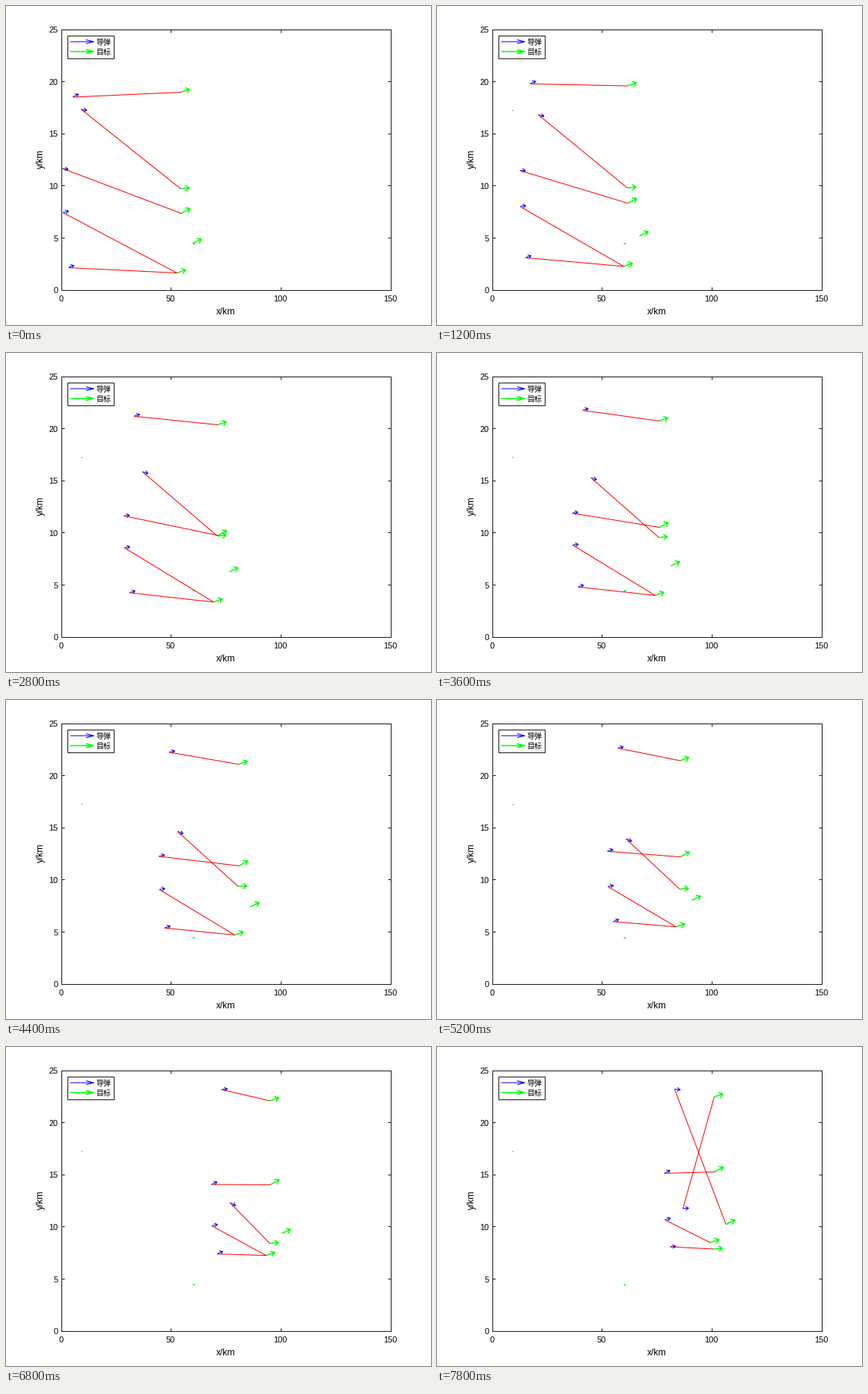
Recreate the animation shown at these times as a matplotlib script. Size 560x420 px, loop 8000 ms.

```python
import numpy as np
import matplotlib.pyplot as plt
from matplotlib.animation import FuncAnimation
from matplotlib.patches import Rectangle

W, H, DPI = 560, 420, 100
PX = 72 / DPI
FRAMES, STEP_MS = 40, 200
SWITCH = 35                 # step at which missiles are reassigned
INK, BLUE, GREEN, RED = "#1c1c1c", "#0000ff", "#00ff00", "#ff0000"
MISSILE_VX, TARGET_VX = 5.77, 3.455

# start x, start y, y at step 34, bend, skew of the bend, turn after SWITCH
MISSILES = [
    (88.5, 120.5, 56.5, -0.037, 0, 0.106),
    (99.5, 136.5, 205.5, -0.029, 0, -0.49),
    (75.0, 214.5, 181.5, 0.050, 0, 0),
    (75.5, 272.5, 236.0, 0, 0.0008, 0.05),
    (82.5, 345.0, 273.0, 0.005, 0.0007, 0.32),
]
# start x, start y, y at step 39, bend, rise of the arrow
TARGETS = [
    (231.0, 114.0, 66.2, -0.0051, -4),
    (230.5, 241.0, 266.5, -0.0250, -1),
    (231.5, 273.5, 165.0, 0.0176, -6.5),
    (246.5, 313.0, 234.0, 0.0113, -5.5),
    (225.7, 352.0, 258.0, 0.0292, -4),
]
LINKS_EARLY = [0, 1, 2, 4, 4]
LINKS_LATE = [3, 0, 2, 4, 1]


def arc(k, y0, y1, span, bend):
    """Straight run from y0 to y1 over span steps, bowed by bend."""
    return y0 + (y1 - y0) * k / span + bend * k * (span - k)


def missile_y(k, y0, y1, bend, skew, turn):
    bowed = arc(k, y0, y1, 34, bend + skew * (k - 17))
    return bowed + turn * max(k - SWITCH, 0) ** 2


def arrow_points(x, y, dx, dy, back, half):
    n = np.hypot(dx, dy)
    ux, uy = dx / n, dy / n
    tx, ty = x + dx, y + dy
    bx, by = tx - back * ux, ty - back * uy
    xs = [x, tx, np.nan, bx - half * uy, tx, bx + half * uy]
    ys = [y, ty, np.nan, by + half * ux, ty, by - half * ux]
    return xs, ys


fig = plt.figure(figsize=(W / DPI, H / DPI), dpi=DPI, facecolor="white")
ax = fig.add_axes([0, 0, 1, 1])
ax.set_xlim(0.5, W + 0.5)
ax.set_ylim(H + 0.5, 0.5)
ax.axis("off")


def stroke(xs, ys, color, width=1.0, z=2, snap=None):
    line, = ax.plot(xs, ys, color=color, lw=width * PX, zorder=z,
                    solid_capstyle="butt", solid_joinstyle="miter")
    if snap:
        line.set_snap(True)
    return line


def label(x, y, text, size, font="Liberation Sans", **kw):
    ax.text(x, y, text, fontsize=size * PX, family=font, color="black", **kw)


def frame_box(x0, y0, x1, y1, z):
    ax.add_patch(Rectangle((x0, y0), x1 - x0, y1 - y0, fc="white", ec=INK,
                           lw=PX, zorder=z, snap=True))


# axes
L, R, T, B = 73, 507, 31, 374
frame_box(L, T, R, B, 0)
for v in range(0, 151, 50):
    x = L + (R - L) * v / 150
    for y0, y1 in ((B, B - 4), (T, T + 4)):
        stroke([x, x], [y0, y1], INK, z=1, snap=True)
    label(x, 389.7, str(v), 11, ha="center", va="baseline")
for v in range(0, 26, 5):
    y = B - (B - T) * v / 25
    for x0, x1 in ((L, L + 4), (R, R - 4)):
        stroke([x0, x1], [y, y], INK, z=1, snap=True)
    label(69, y + 4.7, str(v), 11, ha="right", va="baseline")
label(290.5, 406, "x/km", 12, ha="center", va="baseline")
label(46.5, 202, "y/km", 12, ha="center", va="center", rotation=90)

# legend
frame_box(81, 39, 142, 69, 4)
for y, name, color, width in ((47.5, "导弹", BLUE, 1), (60.5, "目标", GREEN, 1.5)):
    stroke(*arrow_points(85, y, 31, 0, 10, 2.6), color, width, z=5)
    label(119, y + 4.2, name, 10, "Noto Sans CJK JP", va="baseline", zorder=5)

# launch marks
stroke([99.5, 100.9], [137, 137], BLUE, 0.8)
stroke([246.8, 249.2], [313, 313], GREEN, 1.5)

missile_lines = [stroke([], [], BLUE, 1, 2) for _ in MISSILES]
target_lines = [stroke([], [], GREEN, 1.5, 2) for _ in TARGETS]
link_lines = [stroke([], [], RED, 1, 3) for _ in MISSILES]


def draw(k):
    spots = []
    for (x0, y0, y1, bend, rise), line in zip(TARGETS, target_lines):
        x, y = x0 + TARGET_VX * k, arc(k, y0, y1, 39, bend)
        spots.append((x, y))
        line.set_data(*arrow_points(x, y, 11.4, rise, 5, 3.6))

    links = LINKS_EARLY if k < SWITCH else LINKS_LATE
    for (x0, *path), line, link, j in zip(MISSILES, missile_lines,
                                          link_lines, links):
        x, y = x0 + MISSILE_VX * k, missile_y(k, *path)
        vy = missile_y(k + 0.5, *path) - missile_y(k - 0.5, *path)
        line.set_data(*arrow_points(x, y, 7.3, 1.25 * vy, 3.9, 2.6))
        link.set_data([x, spots[j][0]], [y, spots[j][1]])
    return missile_lines + target_lines + link_lines


anim = FuncAnimation(fig, draw, frames=FRAMES, interval=STEP_MS,
                     init_func=lambda: draw(0), repeat=True, repeat_delay=0)
plt.show()
```
